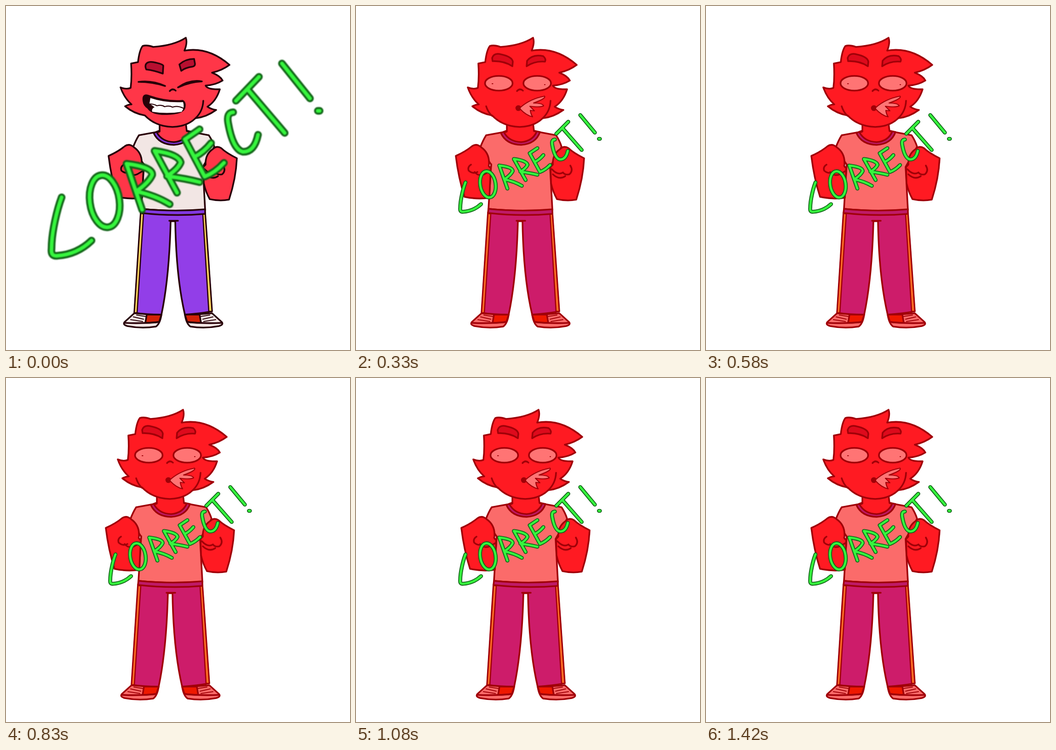
An HTML page that plays this animation: 748x748 px, repeating every 1.46 s.

```html
<!DOCTYPE html>
<html lang="en">
<head>
<meta charset="utf-8">
<title>Correct!</title>
<style>
  html, body { margin: 0; width: 100%; height: 100%; overflow: hidden; background: #fff; }
  svg { display: block; width: 100%; height: 100%; }
  #stage {
    --line: #280008; --skin: #ff3648; --shirt: #f2e6e4; --pants: #923ee8; --collar: #8038e0;
    --stripe: #ffd75e; --panel: #d32208; --brow: #b80f30;
  }
  #stage.hit {
    --line: #a00008; --skin: #ff1a22; --shirt: #fb6b6a; --pants: #cd1c6a; --collar: #be1a68;
    --stripe: #ff6d24; --panel: #ee1800; --brow: #dd0a1c;
  }
  #body { stroke: var(--line); stroke-width: 3.6; stroke-linejoin: round; stroke-linecap: round; fill: none; }
  .skin { fill: var(--skin); }
  .shirt { fill: var(--shirt); }
  .pants { fill: var(--pants); }
  .collar { fill: var(--collar); }
  .stripe { fill: var(--stripe); stroke-width: 2.6; }
  .panel { fill: var(--panel); }
  .brow { fill: var(--brow); }
  .dark { fill: var(--line); }
  .pale { fill: #ff7474; }
  .thin { stroke-width: 2.2; }
  .hit .grin, #stage:not(.hit) .hurt { display: none; }
  #word { fill: none; stroke-linecap: round; stroke-linejoin: round; }
  .rim { stroke: #116417; stroke-width: 16.5; }
  .core { stroke: #36f53e; stroke-width: 8; }
  .hit .core { stroke-width: 9.5; }
  #stage:not(.hit) #word use { filter: blur(1.2px); }
</style>
</head>
<body>
<svg id="stage" viewBox="0 0 748 748">
  <defs>
    <g id="shoe">
      <path class="shirt" d="M279 668L258 687Q253 693 264 696Q295 702 326 697Q335 691 338 671Q305 671 279 668Z"/>
      <path class="panel" d="M306 671L303 689Q320 689 333 687L338 671Z"/>
      <path d="M258 689Q295 691 333 687"/>
      <path class="thin" d="M277 676L299 681M271 682L297 686M284 672L303 675"/>
    </g>
    <g id="letters">
      <path d="M121 416C112 440 99 490 99 528Q97 545 112 543Q155 540 186 510"/>
      <path d="M207 368A32 57 -8 1 0 222 481A32 57 -8 1 0 207 368"/>
      <path d="M296 443L262 343Q319 350 318 367Q311 384 283 403Q325 412 356 431"/>
      <path d="M372 406L323 315Q375 322 380 340Q374 355 350 370Q390 375 421 383"/>
      <path d="M421 268L389 290L432 371Q455 362 474 341M410 328Q430 318 446 298"/>
      <path d="M494 231Q479 232 483 254Q493 312 515 317Q540 318 548 280"/>
      <path d="M500 206L550 154M526 182L606 276"/>
      <path d="M600 125L661 201M678 228h4"/>
    </g>
  </defs>

  <g id="body">
    <use href="#shoe"/>
    <use href="#shoe" transform="matrix(-1 0 0 1 727 0)"/>
    <path class="pants" d="M293 449Q364 458 433 450L448 664Q420 669 389 671Q370 590 368 468L358 468Q355 590 338 671Q305 671 279 667Z"/>
    <path class="stripe" d="M293 451L299 452L285 667L279 667ZM433 451L428 453L441 664L448 664Z"/>
    <path d="M355 467H374"/>

    <path class="shirt" d="M322 275L289 281Q282 292 276 308L300 345L294 441Q364 448 433 443L428 350L453 306Q449 293 441 281L404 274Z"/>
    <path class="collar" d="M294 441Q364 448 433 442L433 452Q364 458 293 450Z"/>
    <path class="collar" d="M321 276Q332 301 365 302Q397 300 406 274L392 271H334Z"/>
    <path class="skin" d="M334 255V273L328 275Q339 295 365 296Q390 294 399 273L393 272L391 255"/>

    <path class="skin" d="M223 326Q245 316 258 305Q268 298 278 307Q297 320 295 345Q293 349 299 352L296 417Q270 421 242 415Q229 375 223 326Z"/>
    <path d="M300 344L298 360M256 345Q248 350 251 358Q260 366 270 361M264 361Q272 371 285 366L297 359"/>
    <path class="skin" d="M502 331Q478 319 468 309Q458 303 450 311Q433 322 434 345L429 350L430 385Q434 404 443 420Q465 425 485 421Q500 375 502 331Z"/>
    <path d="M472 347Q479 358 470 366Q460 368 456 362M432 355Q445 369 456 362M434 366Q448 379 461 370"/>

    <path class="skin" d="M272 125L287 122Q290 96 297 87Q306 84 320 89Q365 86 391 69Q395 80 388 97Q440 88 486 128Q470 140 448 145Q466 152 471 162Q455 172 434 173Q438 182 465 181Q457 207 438 219Q447 225 457 226Q435 242 412 244Q394 262 362 263Q325 262 302 238Q278 234 259 218Q266 214 273 214Q257 200 249 177Q262 182 271 178Q274 155 272 125Z"/>
    <path d="M412 244Q428 229 429 206M356 185Q362 178 369 184"/>

    <g class="grin">
      <path class="brow" d="M304 127Q308 120 320 122Q341 126 342 130L341 147Q322 140 305 138Q302 132 304 127ZM377 127Q390 115 409 115L411 126Q411 131 405 132Q390 134 381 141Z"/>
      <path d="M288 165Q318 161 346 174Q318 165 288 165M374 177Q400 159 426 164Q400 165 374 177"/>
      <path class="dark" d="M299 207Q296 189 312 196Q350 209 384 206Q391 210 388 222Q384 234 350 235Q318 236 309 222Q300 216 299 207Z"/>
      <path fill="#fff" stroke="none" d="M314 200Q345 211 385 209Q389 220 382 230Q350 235 318 230Q316 223 323 220L312 212Z"/>
      <path class="thin" d="M313 213Q322 213 328 217Q338 214 345 219Q355 216 362 220Q372 216 385 222"/>
    </g>

    <g class="hurt">
      <path d="M289 218Q293 231 302 239"/>
      <path class="brow" d="M302 113Q306 101 321 105Q345 110 347 121L346 131Q328 119 303 120ZM377 131L378 119Q390 104 413 109Q420 115 417 121Q395 119 377 131Z"/>
      <ellipse class="pale" cx="316.5" cy="168" rx="30" ry="16"/>
      <ellipse class="pale" cx="400" cy="168" rx="30" ry="16"/>
      <path class="thin" d="M302 169h1.5M416 171h1"/>
      <circle class="dark" cx="359" cy="222" r="4.5"/>
      <path class="pale thin" d="M363 221Q384 202 416 196Q420 201 392 211Q411 211 414 217Q408 221 384 218L394 228L385 227Q386 235 390 241Q376 238 363 224Z"/>
    </g>
  </g>

  <g id="word">
    <use class="rim" href="#letters"/>
    <use class="core" href="#letters"/>
  </g>
</svg>
<script>
  const LOOP = 1460, FPS = 24;
  const stage = document.getElementById('stage');
  const body = document.getElementById('body');
  const word = document.getElementById('word');

  function draw(now) {
    const tick = Math.floor((now % LOOP + 4) * FPS / 1000);
    const hit = tick > 1;
    const shake = hit ? ((tick >> 1) % 2 ? 6 : -6) : 0;
    const shrink = Math.min(tick / 2, 1);
    const sx = 1 - 0.479 * shrink, sy = 1 - 0.497 * shrink;
    stage.classList.toggle('hit', hit);
    body.setAttribute('transform', `translate(${shake} 0)`);
    word.setAttribute('transform', `translate(365.4 350.6) scale(${sx} ${sy}) translate(-365.4 -350.6)`);
  }

  const start = performance.now();
  function loop() {
    draw(performance.now() - start);
    requestAnimationFrame(loop);
  }
  loop();
</script>
</body>
</html>
```
